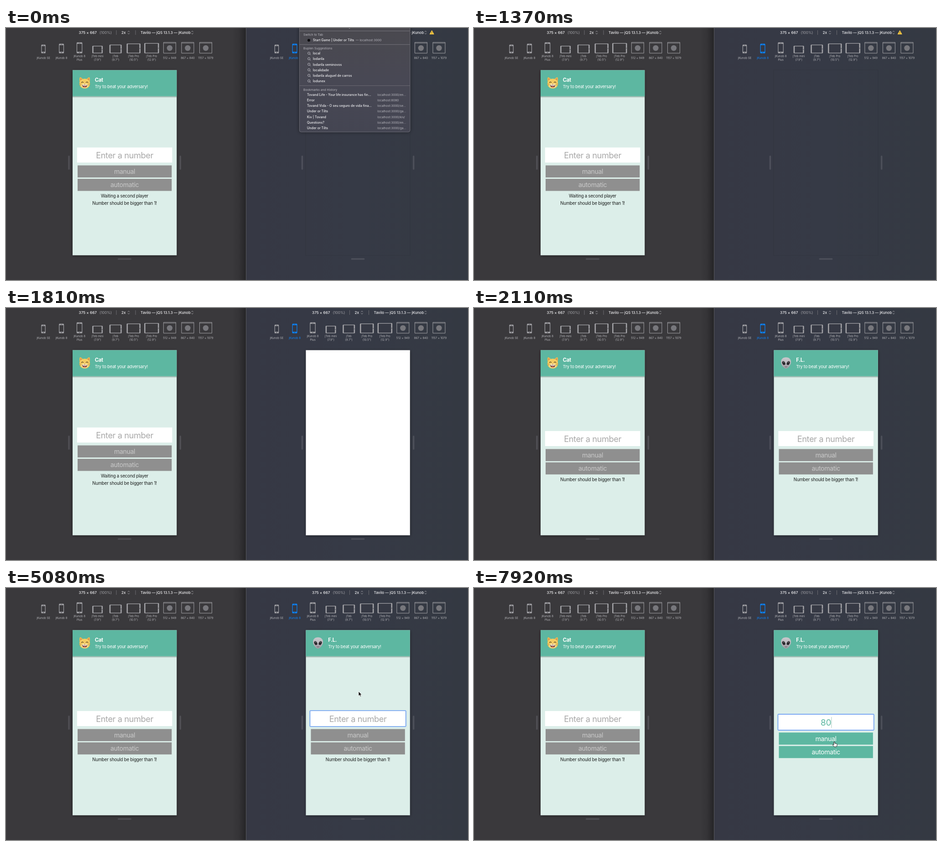
An HTML page with a canvas that plays this animation: 1013x553 px, repeating every 8000 ms.

```html
<!DOCTYPE html>
<html lang="en">
<head>
<meta charset="utf-8">
<title>Two player number game</title>
<style>
html, body { margin: 0; width: 100%; height: 100%; overflow: hidden; background: #3a393c; }
canvas { display: block; width: 1013px; height: 553px; }
</style>
</head>
<body>
<canvas id="stage"></canvas>
<script>
const W = 1013, H = 553, LOOP = 8000, DX = 511.5;
const GREEN = '#5db7a1', MINT = '#dceee9', BLUE = '#0a84ff', ICON = '#a2a2a6';
const FONT = 'Inter, "Open Sans", sans-serif';
const canvas = document.getElementById('stage');
const ctx = canvas.getContext('2d');
const dpr = window.devicePixelRatio || 1;
canvas.width = W * dpr;
canvas.height = H * dpr;

function rect(x, y, w, h, fill, r = 0) {
  ctx.fillStyle = fill;
  ctx.beginPath();
  ctx.roundRect(x, y, w, h, r);
  ctx.fill();
}
function frame(x, y, w, h, stroke, width = 1, r = 0) {
  ctx.strokeStyle = stroke;
  ctx.lineWidth = width;
  ctx.beginPath();
  ctx.roundRect(x, y, w, h, r);
  ctx.stroke();
}
function oval(x, y, rx, ry, fill, turn = 0) {
  ctx.fillStyle = fill;
  ctx.beginPath();
  ctx.ellipse(x, y, rx, ry, turn, 0, Math.PI * 2);
  ctx.fill();
}
function path(d, fill, stroke, width = 1) {
  const p = new Path2D(d);
  if (fill) { ctx.fillStyle = fill; ctx.fill(p); }
  if (stroke) { ctx.strokeStyle = stroke; ctx.lineWidth = width; ctx.stroke(p); }
}
function text(s, x, y, size, fill, weight = 400, align = 'left', tracking = 0) {
  ctx.font = `${weight} ${size}px ${FONT}`;
  ctx.letterSpacing = `${tracking * size}px`;
  ctx.textAlign = align;
  ctx.fillStyle = fill;
  ctx.fillText(s, x, y);
}
const appText = (s, x, y, size, fill, weight, align = 'center') =>
  text(s, x, y, size, fill, weight, align, -0.025);
function at(x, y, draw) {
  ctx.save();
  ctx.translate(x, y);
  draw();
  ctx.restore();
}
function fade(x0, y0, x1, y1, ...colors) {
  const g = ctx.createLinearGradient(x0, y0, x1, y1);
  colors.forEach((c, i) => g.addColorStop(i / (colors.length - 1), c));
  return g;
}

// ---- Window chrome ----
function background() {
  rect(0, 0, 526, H, '#3a393c');
  rect(496, 0, 30, H, fade(496, 0, 526, 0, 'rgba(20,20,22,0)', 'rgba(20,20,22,.15)', 'rgba(20,20,22,.55)'));
  rect(526, 0, W - 526, H, fade(526, 0, W, 0, '#363844', '#363a46', '#343942'));
  rect(526, 0, 1, H, '#59595e');
}

const devices = [
  { w: 9.5, h: 19, label: ['jKunob SE'] },
  { w: 11, h: 21, label: ['jKunob 8'] },
  { w: 12.5, h: 24, label: ['jKunob 8', 'Plus'] },
  { w: 23, h: 16.5, label: ['jTeb mini', '(7.9")'] },
  { w: 27, h: 19, label: ['jTeb', '(9.7")'] },
  { w: 30.5, h: 21.5, label: ['jTeb Pro', '(10.5")'] },
  { w: 32.5, h: 22.5, label: ['jTeb Pro', '(12.9")'] },
  { browser: true, label: ['512 × 949'] },
  { browser: true, label: ['867 × 840'] },
  { browser: true, label: ['1157 × 1079'] }
];

function deviceIcon(d, x, color, bg) {
  if (d.browser) {
    frame(x - 13.5, 31.5, 27, 23.7, color);
    rect(x - 13, 33.3, 26, .7, color);
    oval(x, 44, 6.2, 6.2, '#77777c');
    return;
  }
  const left = x - d.w / 2, top = 55.5 - d.h;
  rect(left, top, d.w, d.h, color, 1.5);
  if (d.w < d.h) {
    rect(left + 1.2, top + 3.2, d.w - 2.4, d.h - 6.6, bg);
    rect(x - 1.3, top + 1.3, 2.6, .7, bg);
    oval(x, 53.8, .9, .9, bg);
  } else {
    rect(left + 2.6, top + 1.3, d.w - 5.2, d.h - 2.6, bg);
    oval(left + d.w - 1.3, 55.5 - d.h / 2, .8, .8, bg);
  }
}

function chevrons(x) {
  path(`M${x - 2} 8.6L${x} 6.6L${x + 2} 8.6M${x - 2} 11.4L${x} 13.4L${x + 2} 11.4`, null, '#b4b4b8', .9);
}

function toolbar(selected, bg) {
  text('375 × 667', 159.5, 13, 8.2, '#eeeef0', 500);
  text('(100%)', 205, 13, 8, '#a5a5aa');
  rect(241.5, 5, 1, 10, '#6c6c71');
  text('2x', 253, 13, 8.2, '#eeeef0', 500);
  chevrons(269);
  rect(283.5, 5, 1, 10, '#6c6c71');
  text('Tavilo — jQS 13.1.3 — jKunob', 295, 13, 8, '#eeeef0', 500);
  chevrons(408.5);
  devices.forEach((d, i) => {
    const x = 82 + i * 39.55, on = i === selected;
    deviceIcon(d, x, on ? BLUE : ICON, bg);
    const y = d.label.length > 1 ? 64.3 : 68.3;
    d.label.forEach((s, n) => text(s, x, y + n * 8, 6.2, on ? BLUE : '#b4b4b8', 400, 'center'));
  });
}

function handles() {
  const c = 'rgba(120,120,128,.36)';
  rect(136.2, 280, 3.6, 31, c, 1.8);
  rect(380.4, 280, 3.6, 31, c, 1.8);
  rect(245, 505.2, 30, 3.4, c, 1.7);
}

function warning() {
  path('M933.7 5.5L938.2 13.6H929.2Z', '#f6c945', '#f6c945', 1);
  rect(933.3, 8, .9, 3, '#7a5a10');
  rect(933.3, 11.8, .9, .9, '#7a5a10');
}

// ---- Faces ----
function cat() {
  path('M-11 -2C-12 -8 -11.5 -12 -10 -12.4C-8 -12 -5.5 -10 -4 -8.4H4C5.5 -10 8 -12 10 -12.4C11.5 -12 12 -8 11 -2Z', '#eebb4c');
  path('M-9.6 -5C-10 -8 -9.8 -10 -9.2 -10.2C-7.8 -9.5 -6.3 -8.4 -5.4 -7.2ZM9.6 -5C10 -8 9.8 -10 9.2 -10.2C7.8 -9.5 6.3 -8.4 5.4 -7.2Z', '#d98f58');
  oval(0, 1.5, 11.6, 10.8, '#f5cd62');
  oval(0, 6, 7.4, 5, '#f9e3a0');
  path('M-7.6 -.2Q-5.2 -4 -2.6 -.6M2.6 -.6Q5.2 -4 7.6 -.2', null, '#4b3525', 1.2);
  path('M-1.4 1.4H1.4L0 3Z', '#b7695a');
  path('M-5.8 4Q-3 5 0 4.1Q3 5 5.8 4Q5.3 10 0 10Q-5.3 10 -5.8 4Z', '#6b3528');
  path('M-4.8 4.5Q-2.6 5.2 0 4.4Q2.6 5.2 4.8 4.5L4.2 6.2H-4.2Z', '#fff');
  oval(0, 8.6, 2.8, 1.2, '#dc7468');
  path('M-12.5 1.6L-7.5 2.8M-12.4 5.2L-7.6 4.8M12.5 1.6L7.5 2.8M12.4 5.2L7.6 4.8', null, '#a07a3c', .6);
}
function alien() {
  path('M0 -12.3C7.5 -12.3 11.3 -7.5 11 -1.6C10.7 5 4.4 12.4 0 12.4C-4.4 12.4 -10.7 5 -11 -1.6C-11.3 -7.5 -7.5 -12.3 0 -12.3Z',
    fade(0, -12, 0, 12, '#c9c8cc', '#bbb9bf', '#9c9aa2'));
  for (const s of [-1, 1]) {
    oval(s * 5, .4, 3.1, 4.5, '#29272c', s * .5);
    oval(s * 5.4, -1.6, 1, 1.3, '#77747c', s * .5);
  }
  path('M-2.6 8Q0 9.8 2.6 8', null, '#4a484e', .9);
  oval(-.8, 5, .3, .5, '#77747c');
  oval(.8, 5, .3, .5, '#77747c');
}

// ---- Phone page ----
function phone(fill) {
  ctx.save();
  ctx.shadowColor = 'rgba(0,0,0,.5)';
  ctx.shadowBlur = 7 * dpr;
  ctx.shadowOffsetY = dpr;
  rect(146, 92.6, 228.3, 406.2, fill);
  ctx.restore();
}

function button(label, y, active) {
  rect(157, y, 206.3, 26.5, active ? GREEN : '#8f8f8f');
  appText(label, 260.1, y + 18.4, 14.1, active ? '#fff' : '#c9c9c9');
}

function page({ name, face, value, notes, focus, caret }) {
  phone(MINT);
  rect(146, 150, 228.3, 3, fade(0, 150, 0, 153, 'rgba(60,90,80,.5)', 'rgba(60,90,80,0)'));
  rect(146, 92.6, 228.3, 57.2, GREEN);
  at(172.6, 120.5, face);
  appText(name, 194.8, 118, 11.2, '#fff', 700, 'left');
  appText('Try to beat your adversary!', 194.8, 132, 9.6, '#fff', 400, 'left');

  // the form is centred vertically, so each missing note lowers it
  const dy = (2 - notes.length) * 7.9;
  rect(155.8, 262.2 + dy, 208.6, 33, '#fff');
  if (focus) frame(154.9, 261.2 + dy, 210.4, 35, '#7ba8f2', 1.9, 1.5);
  appText(value || 'Enter a number', 260, 286.1 + dy, value ? 19 : 18.3, value ? GREEN : '#a9a9a9');
  if (caret) rect(260 + value.length * 6, 267.2 + dy, .8, 24, value ? '#8fb9ae' : '#777');
  button('manual', 301.5 + dy, !!value);
  button('automatic', 330.9 + dy, !!value);
  notes.forEach((s, i) => appText(s, 260, 372.4 + dy + i * 15.8, 9.7, '#1c1f1e'));
}

// ---- Address bar suggestions ----
const searches = ['local', 'lodarila', 'lodarila seminovos', 'localidade', 'lodarila aluguel de carros', 'lodunex'];
const bookmarks = [
  ['Tovand Life - Your life insurance has fin...', '3000/en...'],
  ['Error', '8080'],
  ['Tovand Vida - O seu seguro de vida fina...', '3000/se...'],
  ['Under or Tilts', '3000/ga...'],
  ['Kiv | Tovand', '3000/kiv/'],
  ['Questions?', '3000/en...'],
  ['Under or Tilts', '3000/ga...']
];

function popup(withSearches) {
  const dim = '#b7b6bd', lit = '#f3f3f5', line = '#76757d';
  const shift = withSearches ? 0 : -90.6, bottom = 228.5 + shift;
  ctx.save();
  ctx.shadowColor = 'rgba(0,0,0,.45)';
  ctx.shadowBlur = 9 * dpr;
  rect(643, -10, 243.3, bottom + 10, fade(0, 0, 0, bottom, '#4a494f', '#484854', '#444552'), 4);
  ctx.restore();
  frame(643.4, -10, 242.5, bottom + 9.6, '#74747d', .8, 4);
  text('g', 751, -.6, 7.1, lit, 500);
  rect(643.5, 6, 242.3, .9, line);
  text('Switch to Tab', 652, 17.4, 6.75, dim);
  oval(664, 27, 3, 3, '#0c0c0e');
  text('Start Game | Under or Tilts', 673, 29.2, 7.1, lit, 500);
  text('— localhost:3000', 766.8, 29.2, 6.75, dim);
  rect(643.5, 35.8, 242.3, .9, line);
  if (withSearches) {
    text('Buplen Suggestions', 652, 47.2, 6.75, dim);
    searches.forEach((s, i) => {
      const y = 55.8 + i * 12.15;
      ctx.strokeStyle = '#c9c8ce';
      ctx.lineWidth = .9;
      ctx.beginPath();
      ctx.arc(664.2, y - .5, 2.5, 0, Math.PI * 2);
      ctx.moveTo(666, y + 1.3);
      ctx.lineTo(668.2, y + 3.5);
      ctx.stroke();
      text(s, 673, y + 2.4, 7.1, lit, 500);
    });
    rect(643.5, 126.2, 242.3, .9, line);
  }
  text('Bookmarks and History', 652, 138 + shift, 6.75, dim);
  bookmarks.forEach(([title, url], i) => {
    const y = 148.9 + shift + i * 12.17;
    text(title, 660, y, 7.1, lit, 500);
    text('localhost:' + url, 814.3, y, 6.65, dim);
  });
}

// ---- Mouse ----
const shapes = {
  arrow: () => path('M0 0V10L2.3 7.9L3.9 11.4L5.6 10.6L4.1 7.2H7.2Z', '#111', '#fff', .8),
  beam: () => path('M-2.2 -5Q0 -5 0 -3.6Q0 -5 2.2 -5M0 -4V4M-2.2 5Q0 5 0 3.6Q0 5 2.2 5M-1.2 1.5H1.2', null, '#222', 1),
  hand: () => path('M-1 .3Q.2 -.6 .9 .6L1.4 4Q2.5 3.2 3.3 4.1Q4.4 3.6 5 4.7Q6.3 4.6 6.3 6L5.9 8.6L4.9 11H-.4L-3.6 7.2Q-4 5.6 -2.6 5.8L-1 7Z', '#fff', '#111', .9)
};
const moves = [
  [2560, 889, 40, 'arrow'], [2710, 879, 105, 'arrow'], [2860, 860, 180, 'arrow'], [3010, 838, 243, 'arrow'],
  [3150, 816, 286, 'beam'], [3290, 804, 300, 'beam'], [3440, 802, 292, 'beam'],
  [4190, 745, 280, 'beam'], [4340, 661, 258, 'arrow'], [4490, 728, 238, 'arrow'], [4630, 773, 227, 'arrow'],
  [6720, 773, 231, 'arrow'], [6870, 775, 247, 'arrow'], [7020, 780, 272, 'arrow'], [7170, 787, 296, 'beam'],
  [7320, 793, 318, 'hand'], [7470, 792, 332, 'hand'], [7620, 790, 337, 'arrow'], [7920, 790, 337.4, 'hand']
];
function mouse(t) {
  const m = moves.findLast(([start]) => t >= start);
  if (m) at(m[1], m[2], shapes[m[3]]);
}

const within = (t, ...spans) => spans.some(([a, b]) => t >= a && t < b);
const RULE = 'Number should be bigger than 1!';

function draw(t) {
  ctx.setTransform(dpr, 0, 0, dpr, 0, 0);
  ctx.lineJoin = 'round';
  const joined = t >= 2110;
  background();

  toolbar(-1, '#3a393c');
  handles();
  page({ name: 'Cat', face: cat, value: '', notes: joined ? [RULE] : ['Waiting a second player', RULE] });

  at(DX, 0, () => {
    toolbar(1, '#363944');
    handles();
    if (joined) {
      const value = t < 5380 ? '' : t < 5680 ? '8' : '80';
      page({
        name: 'F.L.', face: alien, value,
        notes: value ? [] : [RULE],
        focus: t >= 3440,
        caret: within(t, [3440, 4040], [4490, 5080], [5380, 6120], [6720, 7170], [7620, LOOP])
      });
    } else if (t >= 1810) {
      phone('#fff');
    } else {
      frame(145.5, 92, 229, 407, 'rgba(20,22,30,.12)', 1);
    }
  });
  if (t < 1520) warning();
  if (t < 1370) popup(t < 600);
  mouse(t);
}

const start = performance.now();
function tick() {
  draw((performance.now() - start) % LOOP);
  requestAnimationFrame(tick);
}
tick();
</script>
</body>
</html>
```
